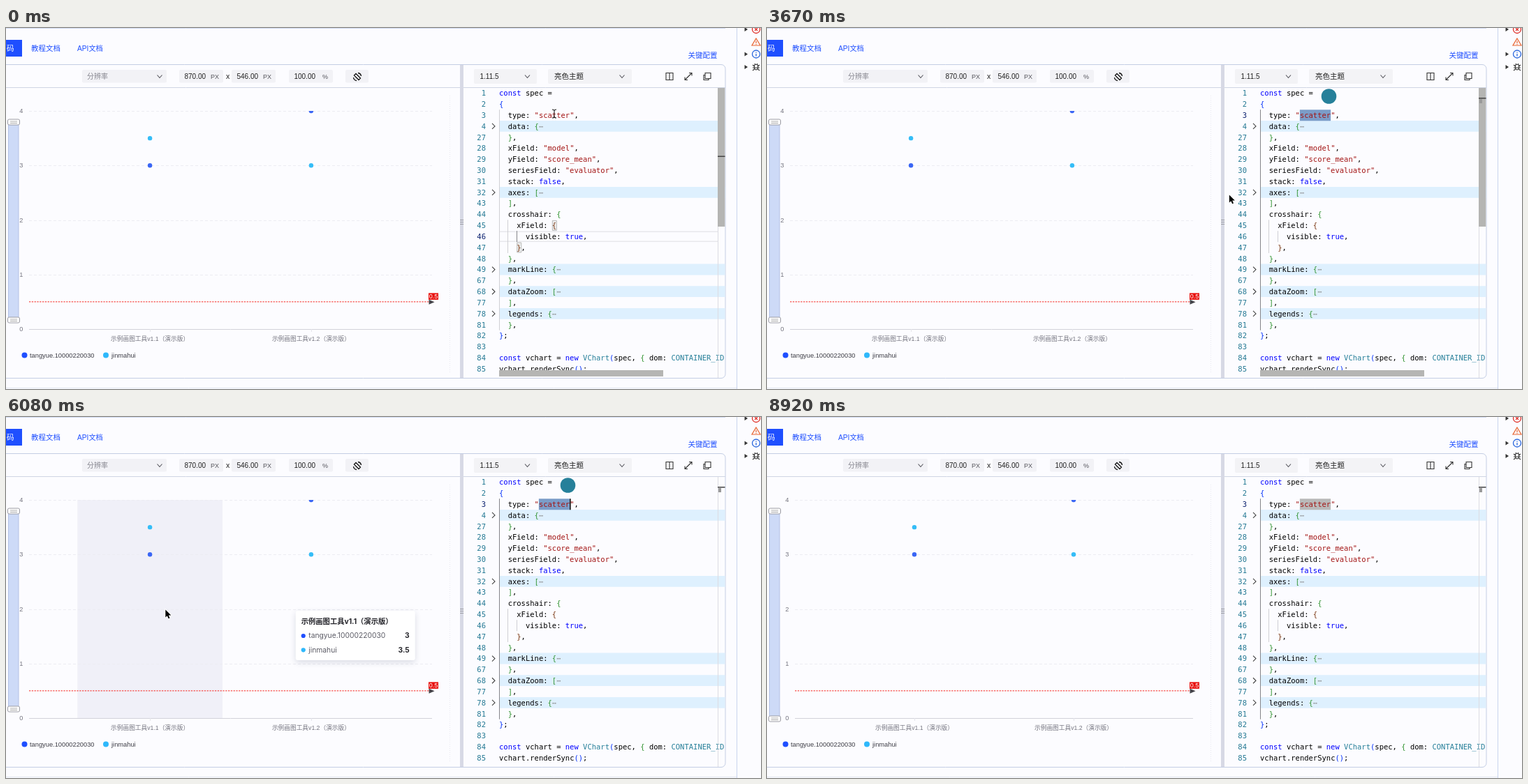
Recreate the animation shown at these times as an HTML page with a canvas. Size 1081 px wide and 518 px high, loop 9.83 s.

```html
<!DOCTYPE html>
<html lang="zh">
<head>
<meta charset="utf-8">
<style>
html, body { margin: 0; height: 100%; overflow: hidden; background: #fcfcff; }
canvas { display: block; }
</style>
</head>
<body>
<canvas id="stage" width="1081" height="518"></canvas>
<script>
const c = document.getElementById('stage').getContext('2d');
const LOOP = 9830, STEP = 1000 / 12;
const HOVER_LAG = 60, TIP_LAG = 220;
const SANS = '"Liberation Sans","Noto Sans CJK SC","Noto Sans CJK",sans-serif';
const INTER = 'Inter,"Noto Sans CJK SC","Noto Sans CJK",sans-serif';
const MONO = '"DejaVu Sans Mono",monospace';
const BLUE = '#1f4fff', CYAN = '#2fb8fb', GREY = '#74747f', DARK = '#25252b';
const MODELS = ['示例画图工具v1.1（演示版）', '示例画图工具v1.2（演示版）'];
const USERS = [['tangyue.10000220030', BLUE], ['jinmahui', CYAN]];
const POINTS = [[[0, 3], [1, 3.5]], [[1, 3], [0, 4]]]; // per model: [user, score]

// time, x, y
const MOUSE = [
  [0, 785, 123], [1000, 785, 123], [1080, 798, 125], [1250, 775, 180], [1420, 715, 190],
  [1580, 590, 187], [1750, 470, 185], [2000, 210, 212], [2197, 175, 221], [2416, 336, 301],
  [2670, 570, 300], [2750, 660, 285], [3000, 745, 275], [3330, 752, 268], [3580, 725, 255],
  [3666, 662, 239], [3830, 500, 232], [4080, 310, 230], [4363, 283, 235], [4583, 415, 236],
  [4750, 450, 250], [5100, 75, 280], [5530, 218, 258], [5750, 362, 279], [5863, 407, 270],
  [6083, 228, 276], [6400, 55, 230], [6750, 60, 210], [7000, 20, 160], [7250, 11, 136],
  [7420, 11, 136], [7830, 11, 200], [8000, 11, 232], [8170, 11, 232], [8500, 11, 135], [8670, 60, 150]
];
const BARS = [[0, 1], [1700, 1], [2170, 0], [2700, 0], [2850, 1], [4050, 1], [4500, 0]];

const CODE = `1 const spec =
2 {
3   type: "scatter",
4   data: {⋯
27   },
28   xField: "model",
29   yField: "score_mean",
30   seriesField: "evaluator",
31   stack: false,
32   axes: [⋯
43   ],
44   crosshair: {
45     xField: {
46       visible: true,
47     },
48   },
49   markLine: {⋯
67   },
68   dataZoom: [⋯
77   ],
78   legends: {⋯
81   },
82 };
83 
84 const vchart = new VChart(spec, { dom: CONTAINER_ID });
85 vchart.renderSync();`.split('\n').map(s => [s.split(' ')[0], s.slice(s.indexOf(' ') + 1)]);
const X0 = 706, CW = 6.32, rowY = i => 93.5 + i * 15.82;

function sample(keys, t) {
  const i = keys.findIndex(k => k[0] > t);
  if (i < 0) return keys[keys.length - 1].slice(1);
  if (i === 0) return keys[0].slice(1);
  const a = keys[i - 1], b = keys[i], f = (t - a[0]) / (b[0] - a[0]);
  return a.slice(1).map((v, j) => v + (b[j + 1] - v) * f);
}
function text(s, x, y, size, color, align = 'left', family = SANS, weight = '') {
  c.font = `${weight} ${size}px ${family}`;
  c.textAlign = align;
  c.fillStyle = color;
  c.fillText(s, x, y + size * .36);
}
function rect(x, y, w, h, fill, stroke, r = 0) {
  c.beginPath();
  c.roundRect(x, y, w, h, r);
  if (fill) { c.fillStyle = fill; c.fill(); }
  if (stroke) { c.strokeStyle = stroke; c.lineWidth = 1; c.stroke(); }
}
function line(x1, y1, x2, y2, color, dash = [], w = 1) {
  c.beginPath();
  c.setLineDash(dash);
  c.moveTo(x1, y1);
  c.lineTo(x2, y2);
  c.strokeStyle = color;
  c.lineWidth = w;
  c.stroke();
  c.setLineDash([]);
}
function dot(x, y, r, color) {
  c.beginPath();
  c.arc(x, y, r, 0, 7);
  c.fillStyle = color;
  c.fill();
}
function path(d, x, y, stroke, fill, w = 1.1) {
  const p = new Path2D(d);
  c.save();
  c.translate(x, y);
  if (stroke) { c.strokeStyle = stroke; c.lineWidth = w; c.stroke(p); }
  if (fill) { c.fillStyle = fill; c.fill(p); }
  c.restore();
}
const chevron = (x, y) => path('M-3.5-2L0 2L3.5-2', x, y, '#55555c');
const field = (x, w) => rect(x, 60, w, 18.5, '#f2f2f6', null, 2);

function page() {
  rect(0, 0, 1081, 518, '#fcfcff');
  line(0, .5, 1030, .5, '#d3ddf3');
  line(0, 516.5, 1046, 516.5, '#e4e8f3');
  line(1046.5, 0, 1046.5, 518, '#c9d4ee');
  rect(-5, 17, 28, 24, BLUE);
  text('码', 1, 29, 10.5, '#fff');
  text('教程文档', 36, 29, 10.5, BLUE);
  text('API文档', 102, 29, 10.2, BLUE);
  text('关键配置', 976.5, 39.5, 10.5, BLUE);
  rect(-9, 52.5, 1039, 450, null, '#c4cee4', 6);
  line(0, 85.5, 1030, 85.5, '#cfd5e3');

  field(109, 121);
  text('分辨率', 116, 69.5, 10, '#85858e');
  chevron(220, 69.5);
  [[248, 63, '870.00', 'PX', 305], [323, 63, '546.00', 'PX', 380], [405, 63, '100.00', '%', 461]]
    .forEach(([x, w, value, unit, end]) => {
      field(x, w);
      text(value, x + 7.5, 69.5, 10, '#222');
      text(unit, end, 69.5, 9, '#55555c', 'right');
    });
  text('x', 315, 69.5, 10.5, '#222');
  field(486, 33);
  path('M-4.5-2L-2-4.5L4.5 2L2 4.5ZM1-5.5Q5-5 5.5-1M-1 5.5Q-5 5-5.5 1', 503, 70, '#111', null, 1.3);
  rect(670, 59, 90, 21, '#f3f3f6', null, 2);
  rect(776, 59, 120, 21, '#f3f3f6', null, 2);
  text('1.11.5', 678.5, 69.5, 10, '#222');
  text('亮色主题', 785, 69.5, 10.5, '#222');
  chevron(746.5, 69.5);
  chevron(882, 69.5);
  path('M-5-5H5V5H-5ZM0-5V5', 950, 69.5, '#333');
  path('M1-5H5V-1M5-5L-5 5M-5 1V5H-1', 977, 69.5, '#333');
  path('M-3-5H5V3H-3ZM-3-2H-5V5H2V3', 1004, 69.5, '#333');

  rect(650, 53, 5, 449, '#d7d9e5');
  for (let i = 0; i < 6; i++) rect(651 + i % 2 * 2.5, 275 + (i >> 1) * 3, 1, 1, '#444');
  line(635.5, 97, 635.5, 495, '#e9e9f1', [1, 2]);

  [2, 37.5, 56].forEach(y => path('M-2-3L2.5 0L-2 3Z', 1059.5, y, null, '#333'));
  path('M-5.5 0A5.5 5.5 0 1 0 5.5 0A5.5 5.5 0 1 0-5.5 0M-2-2L2 2M2-2L-2 2', 1074, 2, '#e0322b', null, 1.3);
  path('M0-5L6 5H-6ZM0-1.5V2M0 3V4', 1074, 20, '#e8622d', null, 1.2);
  path('M-5.5 0A5.5 5.5 0 1 0 5.5 0A5.5 5.5 0 1 0-5.5 0M0-3V-1.7M0-.5V3', 1074, 37.5, '#2a67dd', null, 1.3);
  path('M-2.5-2.5Q0-5 2.5-2.5V2Q0 6-2.5 2ZM-5-3L-2.5-1M-5 1H5M-5 5L-2.5 3M5-3L2.5-1M5 5L2.5 3M-2-5L-1-3M2-5L1-3',
    1074, 56, '#333');
}

function caret(col, row) {
  rect(X0 + col * CW, rowY(row) - 8, 1.5, 16, '#000');
}

function editor(t) {
  const selected = t >= 660, row = t < 500 ? 13 : 2, bars = sample(BARS, t)[0];
  c.save();
  c.beginPath();
  c.rect(656, 86, 373.5, 416);
  c.clip();
  CODE.forEach(([, s], i) => {
    if (s.includes('⋯')) rect(X0, rowY(i) - 8, 324, 15.8, '#def0fe');
  });
  if (selected) rect(X0 + 9 * CW, rowY(2) - 8, 7 * CW, 16, t < 7410 ? '#7b9cc8' : '#b9b9b9');
  else [-7, 7].forEach(d => line(X0, rowY(row) + d, 1019, rowY(row) + d, '#dedee2'));
  const guide = (col, a, b, on) => {
    const x = Math.floor(X0 + col * CW) + .5;
    line(x, rowY(a) - 8, x, rowY(b) + 8, on ? '#85858a' : '#d0d0d4');
  };
  guide(0, 2, 21, row === 2);
  guide(2, 12, 14);
  guide(4, 13, 13, row === 13);
  if (row === 13) [[12, 12], [4, 14]].forEach(([col, r]) =>
    rect(X0 + col * CW + .5, rowY(r) - 7, 6, 14, '#eeeeee', '#b9b9b9'));

  let depth = 0;
  CODE.forEach(([num, s], i) => {
    const y = rowY(i);
    text(num, 687, y, 10.5, i === row ? '#0b216f' : '#237893', 'right', MONO);
    if (s.includes('⋯')) path('M-2-4L2 0L-2 4', 698, y, '#444');
    for (const m of s.matchAll(/"[^"]*"|\w+|[^\s\w"]/g)) {
      const w = m[0];
      let color = '#000';
      if (w[0] === '"') color = '#a31515';
      else if (/^(const|new|true|false)$/.test(w)) color = '#0000ff';
      else if (/^(VChart|CONTAINER_ID)$/.test(w)) color = '#267f99';
      else if (w === '⋯') color = '#888';
      else if ('{[('.includes(w)) color = ['#0431fa', '#319331', '#7b3814'][depth++];
      else if ('}])'.includes(w)) color = ['#0431fa', '#319331', '#7b3814'][--depth];
      text(w, X0 + m.index * CW, y, 10.5, color, 'left', MONO);
    }
  });
  if (t >= 249 && t < 500) caret(20, 13);
  if (selected && t < 7410 && (t + 20) % 1000 < 420) caret(16, 2);

  line(1019.5, 86, 1019.5, 502, '#dcdce2');
  c.globalAlpha = bars;
  rect(1019, 86, 10.5, 199, '#b5b5b3');
  rect(X0, 491, 235, 9, '#b5b5b3');
  c.globalAlpha = 1;
  if (row === 13) rect(1019, 183.5, 11, 1.5, '#444');
  else {
    rect(1019, 100, 11, 1.5, '#444');
    rect(1020, 102, 4, 6, '#9a9a9a');
  }
  c.restore();
  if (t >= 1000 && t < 8740) dot(804.5, 98, 10.8, '#26809a');
}

function ticks(max) {
  const raw = max / 5, step = raw > .707 ? 1 : raw > .316 ? .5 : .2;
  return Array.from({ length: Math.floor(max / step + 1e-6) + 1 }, (_, i) => i * step);
}

function handle(y) {
  rect(2.5, y - 4, 17, 8, '#fff', '#9a9aa2', 2);
  line(6, y - 1, 16, y - 1, '#aaa');
  line(6, y + 1.5, 16, y + 1.5, '#aaa');
}

function chart(t, mouse) {
  const zoomed = t >= 7490, dragging = t >= 7410 && t < 8490;
  const left = zoomed ? 40 : 33, width = 610 - left, bottom = zoomed ? 433 : 419;
  const top = zoomed && t < 8500 ? mouse[1] : 135;
  const max = zoomed ? 4 * (433 - top) / 298 : 4;
  const yOf = v => 432 - 313 * v / max, xOf = i => left + width * (.3 + .4 * i);
  // the crosshair trails the pointer slightly
  const [hx, hy] = sample(MOUSE, t - HOVER_LAG);
  const inside = hx >= left && hx <= 610 && hy >= 119 && hy <= 432;
  const hot = inside && t < 8900 ? +(hx > left + width / 2) : -1;

  if (hot >= 0) rect(xOf(hot) - width * .18, 119, width * .36, 313, '#f0f0f8');
  ticks(max).forEach(v => {
    const y = Math.round(yOf(v)) + .5;
    line(left, y, 610, y, v ? '#ececf2' : '#d2d2da', v ? [4, 3] : []);
    text(+v.toFixed(1), left - 8.7, y - .5, 9.2, GREY, 'right');
  });
  MODELS.forEach((name, i) => {
    line(xOf(i) + .5, 432, xOf(i) + .5, 436, '#e4e4ea');
    text(name, xOf(i), 445.5, 8.7, GREY, 'center');
  });

  c.save();
  c.beginPath();
  c.rect(left, 119, width, 314);
  c.clip();
  POINTS.forEach((list, i) => list.forEach(([u, v]) =>
    dot(xOf(i), yOf(v), 3.2, u ? '#35bdf7' : '#3a66f5')));
  c.restore();

  const my = yOf(.5);
  line(left, my, 606, my, '#f5221b', [2.3, 1.5]);
  path('M0-3.5L8 0L0 3.5Z', 605.5, my + .3, null, '#44444a');
  rect(605, my - 12.5, 14, 9.5, '#e8100c');
  text('0.5', 612, my - 7.7, 9, '#fff', 'center');

  rect(3, 135, 15, bottom - 135, '#f1f3f4');
  rect(3.5, top, 14.5, bottom - top, '#cddaf7', '#b3c1e4');
  handle(top);
  handle(bottom);
  if (dragging) {
    text(max, 10.5, top - 12, 9.2, GREY, 'center');
    text('3', 10.5, bottom - 11, 9.2, GREY, 'center');
  }
  USERS.forEach(([name, color], i) => {
    dot(i ? 143 : 26.5, 469.5, 4, color);
    text(name, i ? 151 : 34, 469.5, 9.3, '#3d3d45');
  });
  if (hot >= 0 && t < 7400) tooltip(hot, sample(MOUSE, t - TIP_LAG));
}

function tooltip(i, [mx, my]) {
  const x = Math.min(mx + 8, 475), y = my + 8, w = i ? 161 : 171;
  c.save();
  c.shadowColor = 'rgba(40,50,90,.16)';
  c.shadowBlur = 9;
  c.shadowOffsetY = 3;
  rect(x, y, w, 71, '#fff', null, 3);
  c.restore();
  text(MODELS[i], x + 8, y + 15, 10.3, DARK, 'left', INTER, 'bold');
  POINTS[i].forEach(([u, v], k) => {
    const ry = y + 35.5 + k * 20.3;
    dot(x + 11, ry + .5, 3.1, USERS[u][1]);
    text(USERS[u][0], x + 18.5, ry, 10.3, '#5c5c66', 'left', INTER);
    text(v, x + w - 8, ry, 10.3, DARK, 'right', INTER, 'bold');
  });
}

function cursor(t, [x, y]) {
  if (t >= 8740) return;
  if (x > 672) path('M-3-6Q0-6 0-4V4Q0 6-3 6M3-6Q0-6 0-4V4Q0 6 3 6', x, y, '#222');
  else if (x < 20) path('M0-6L3.5-2H1V2H3.5L0 6L-3.5 2H-1V-2H-3.5Z', x, y + .5, '#fff', '#000', 1.5);
  else path('M0 0V11L2.5 8.7L4.3 12.8L6.2 12L4.4 8H8Z', x + .5, y + .5, '#fff', '#000', 1.6);
}

function frame(now) {
  const t = Math.floor((now % LOOP + 5) / STEP) * STEP, mouse = sample(MOUSE, t);
  page();
  chart(t, mouse);
  editor(t);
  cursor(t, mouse);
  requestAnimationFrame(() => frame(performance.now() - start));
}
const start = performance.now();
frame(0);
</script>
</body>
</html>
```
